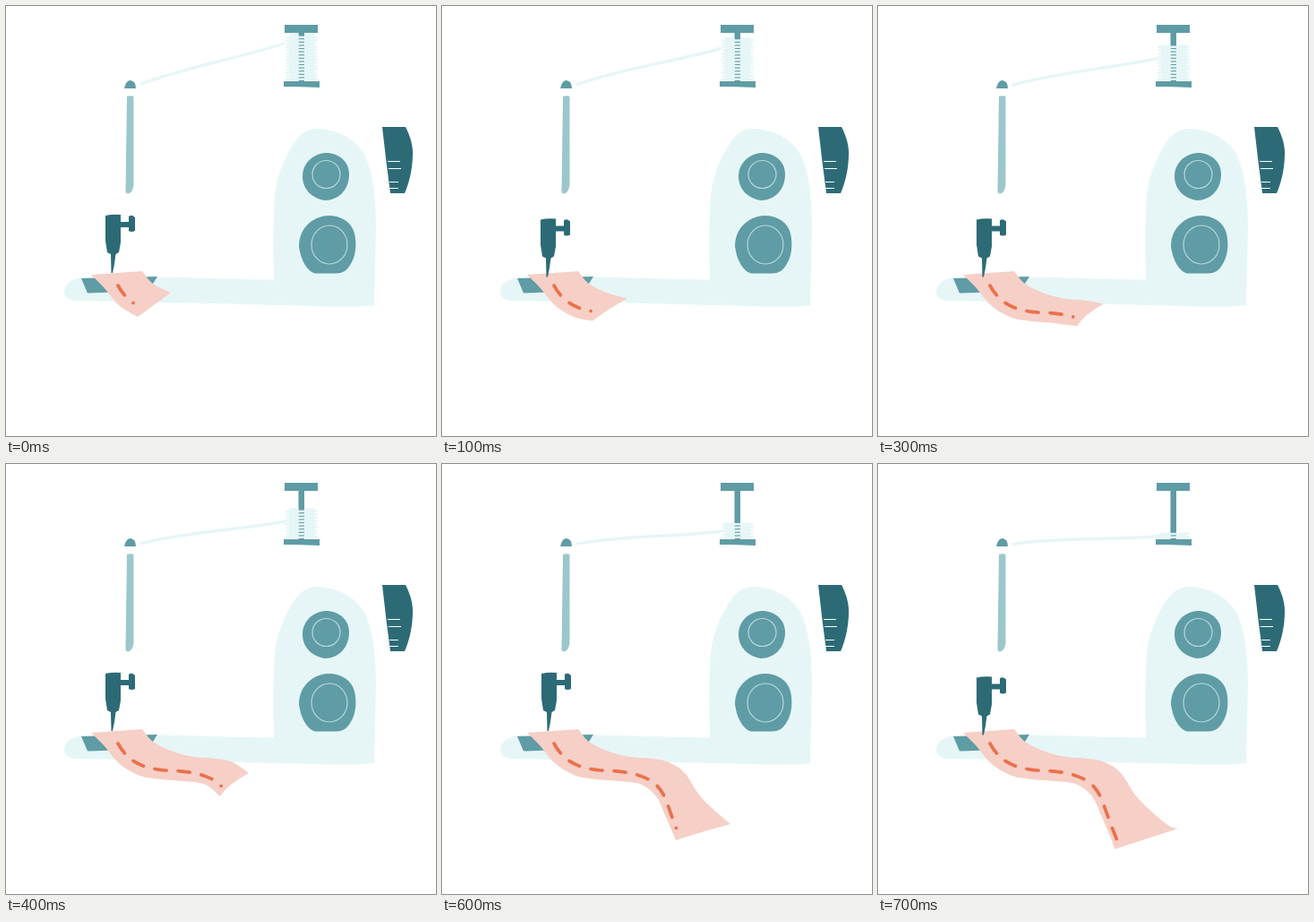
These frames come from a looping animation (480x480 px, 1.7 s). An HTML page:

```html
<!DOCTYPE html>
<html lang="en">
<head>
<meta charset="utf-8">
<title>Sewing machine</title>
<style>
  html, body { margin: 0; width: 100%; height: 100%; overflow: hidden; background: #fff; }
  svg { display: block; width: 100%; height: 100%; }
  .pale { fill: #e6f6f7; }
  .teal { fill: #5f9ca5; }
  .dark { fill: #2c6b76; }
  .ring { fill: none; stroke: #b4d8db; stroke-width: 1.2; }
  .thread { fill: none; stroke: #e6f6f7; stroke-linecap: round; }
  #seam { fill: none; stroke: #e9714c; stroke-width: 3.7; stroke-linecap: round; }
</style>
</head>
<body>
<svg viewBox="0 0 480 480">
  <!-- machine body -->
  <path class="pale" d="M299 305.500C298 270 298 240 300 212C302 190 310 172 319 157C327 143 336 137 346 137C366 137 388 146 399 164C410 183 413 215 413 246L411 334C380 338 340 334 300 334L230 332L80 329Q64 329 65 317Q67 306 85 303C150 300 230 305 299 305.500Z"/>
  <path class="teal" d="M84 304L169 302L159 318L91 320.500Z"/>
  <path class="teal" d="M357 164C372 164 383 174 383 188C383 205 371 217 356 217C342 215 331 205 331 190C331 176 342 165 357 164Z"/>
  <ellipse class="ring" cx="357.500" cy="188" rx="15.500" ry="15.500"/>
  <path class="teal" d="M360 234C374 234 386 241 389 254C393 272 388 288 378 296Q374 298.500 368 298.500H345C336 296 329 284 327 268C327 250 340 235 360 234Z"/>
  <ellipse class="ring" cx="361" cy="266.500" rx="20" ry="21.500"/>

  <!-- hand wheel -->
  <path class="dark" d="M420 135H446C452 147 454 156 454 164C454 180 451 195 445 209H429Q424 172 420 135Z"/>
  <path d="M426 173.500H440M427 181.500H441M428 196.500H438M428 203.500H438" stroke="#fff" stroke-width="1.100"/>

  <!-- thread guide -->
  <path class="teal" d="M132 92Q134 83 139 83Q145 84 145 92Z"/>
  <path fill="#9bc7cb" d="M135 101Q139 99.500 142.500 101V200Q141 209 136 209.500Q133 209 133.500 205Z"/>

  <!-- spool -->
  <path class="teal" d="M311 21H348V30H333V84H350V91L322 90H310V84H326.500V30H311Z"/>
  <path id="wound" class="pale"/>
  <path id="strands" class="thread" stroke-width="2.500"/>
  <path id="thread" class="thread" stroke-width="3.400"/>

  <path id="cloth" fill="#f6cfc6"/>
  <path id="seam" d="M125 312C137 334 155 340 178 342C215 343 239 349 249 373C255 388 260 404 267 420"/>

  <path id="needle" class="dark" d="M111 234Q119 232 128 233V241H137V235Q140 232 144 236V251Q140 253 137 251V247H128V264L126 275L122.500 277L121 288L119 298H117.500L117 277L113 275L111 262Z"/>
</svg>
<script>
const LOOP = 1700, STEP = 100, LAST = 7;
const STITCH = 13, GAP = 13;

// Key points of the cloth's two edges; every step feeds out one more of each.
const upper = [[152, 296], [164, 310], [184, 320], [207, 326.5], [231, 328.5],
  [252, 332.5], [271, 345], [290, 373], [322, 402], [335, 407]];
const lower = [[95, 300], [109, 314], [126, 334], [147, 347], [168, 351.5],
  [197, 354], [222, 357.5], [239, 371], [249, 392], [261, 420], [264, 430]];

const setAttr = (id, name, value) => document.getElementById(id).setAttribute(name, value);

// Catmull-Rom spline as cubic segments, without the opening move.
function spline(points) {
  let d = "";
  for (let i = 0; i < points.length - 1; i++) {
    const a = points[i], b = points[i + 1];
    const before = points[i - 1] || a, after = points[i + 2] || b;
    const c1 = a.map((v, k) => v + (b[k] - before[k]) / 6);
    const c2 = b.map((v, k) => v - (after[k] - a[k]) / 6);
    d += `C${c1} ${c2} ${b}`;
  }
  return d;
}

function clothPath(step) {
  const top = upper.slice(0, step + 3);
  const bottom = lower.slice(0, step + 4).reverse();
  const [x1, y1] = top[top.length - 1], [x2, y2] = bottom[0];
  const bend = 8 * Math.sin(Math.PI * step / LAST);
  return `M${top[0]}${spline(top)}Q${(x1 + x2) / 2 - bend} ${(y1 + y2) / 2} ${x2} ${y2}${spline(bottom)}Z`;
}

function seamDashes(step) {
  return `${STITCH} ${GAP} `.repeat(step + 1) + "0 999";
}

function strandsPath(top) {
  let d = "";
  for (let y = 82, i = 0; y >= top + 1; y -= 3.6, i++) {
    d += `M${313 + i % 2} ${y}L${347 - i % 3 / 2} ${y - 0.6}`;
  }
  return d;
}

function threadPath(step) {
  const x = 151, y = 87 + step / 3;
  const dx = 159 + step / 2, dy = 42 + 5.5 * step - y;
  return `M${x} ${y}c${dx / 3} ${dy / 3 - 5} ${dx * 2 / 3} ${dy * 2 / 3 + 2} ${dx} ${dy}`;
}

function draw(step) {
  const top = 31 + 3.6 * step + 0.06 * step ** 3;  // the spool empties ever faster
  setAttr("wound", "d", `M316 ${top}H326.500V83H316ZM333 ${top}H344V83H333Z`);
  setAttr("strands", "d", strandsPath(top));
  setAttr("thread", "d", threadPath(step));
  setAttr("cloth", "d", clothPath(step));
  setAttr("seam", "stroke-dasharray", seamDashes(step));
  setAttr("needle", "transform", step % 2 ? "translate(-1 4.5)" : "");
}

const start = performance.now();
let shown = -1;
function tick() {
  const time = (performance.now() - start) % LOOP;
  const step = Math.min(LAST, Math.floor(time / STEP));
  if (step !== shown) draw(shown = step);
  requestAnimationFrame(tick);
}
tick();
</script>
</body>
</html>
```
